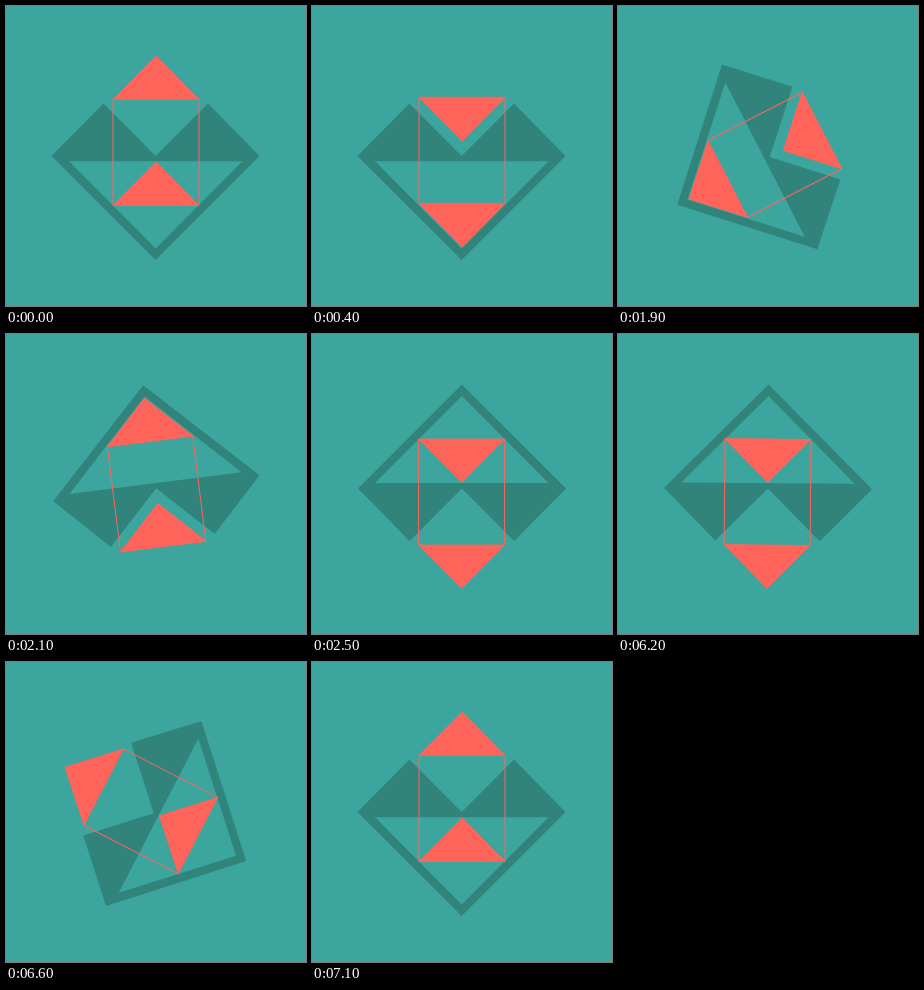
Animation of 300 by 300 pixels, one loop 8 s. Source, as an HTML page:

```html
<!DOCTYPE html>
<html lang="en">
<head>
<meta charset="utf-8">
<title>Turning envelope</title>
<style>
  html, body { margin: 0; height: 100%; overflow: hidden; background: #3ca59d; }
  svg { display: block; width: 100vw; height: 100vh; }
</style>
</head>
<body>
<svg viewBox="0 0 300 300">
  <g id="figure">
    <path fill="#30847c" fill-rule="evenodd"
      d="M45.5 150 97.5 97.5 149.7 150 202 97.5 253.5 150 149.7 254Z M63 155.3H236.5L149.7 242.5Z"/>
    <g id="arrows" fill="#ff645b">
      <path fill="none" stroke="#ff645b" d="M107 93.3H193V199.3H107Z"/>
      <path class="tip"/>
      <path class="tip" transform="translate(0 106)"/>
    </g>
  </g>
</svg>
<script>
  const LOOP = 8000, STEP = 100;
  const figure = document.getElementById('figure');
  const arrows = document.getElementById('arrows');
  const tips = document.querySelectorAll('.tip');

  const progress = (t, start, length) => Math.min(1, Math.max(0, (t - start) / length));

  // Mirrors an ease-in curve around its midpoint.
  const inOut = easeIn => x => x < 0.5 ? easeIn(2 * x) / 2 : 1 - easeIn(2 - 2 * x) / 2;
  const expo = inOut(x => x <= 0 ? 0 : 2 ** (10 * x - 10));
  const cubic = inOut(x => x ** 3);

  function draw(t) {
    const turns = expo(progress(t, 1445, 960)) + expo(progress(t, 6095, 960));
    const flip = cubic(progress(t, 100, 300)) - cubic(progress(t, 2200, 300));

    figure.setAttribute('transform', `rotate(${180 * turns} 149.8 152.2)`);
    arrows.setAttribute('transform', `translate(0 ${-2 * flip})`);
    const apex = 93.5 - 44 * (1 - 2 * flip);
    tips.forEach(tip => tip.setAttribute('d', `M106.5 93.5H193.5L150 ${apex}Z`));
  }

  // The motion advances at ten poses per second.
  const begin = performance.now();
  function tick() {
    const t = (performance.now() - begin) % LOOP;
    draw(Math.floor(t / STEP) * STEP);
    requestAnimationFrame(tick);
  }
  tick();
</script>
</body>
</html>
```
